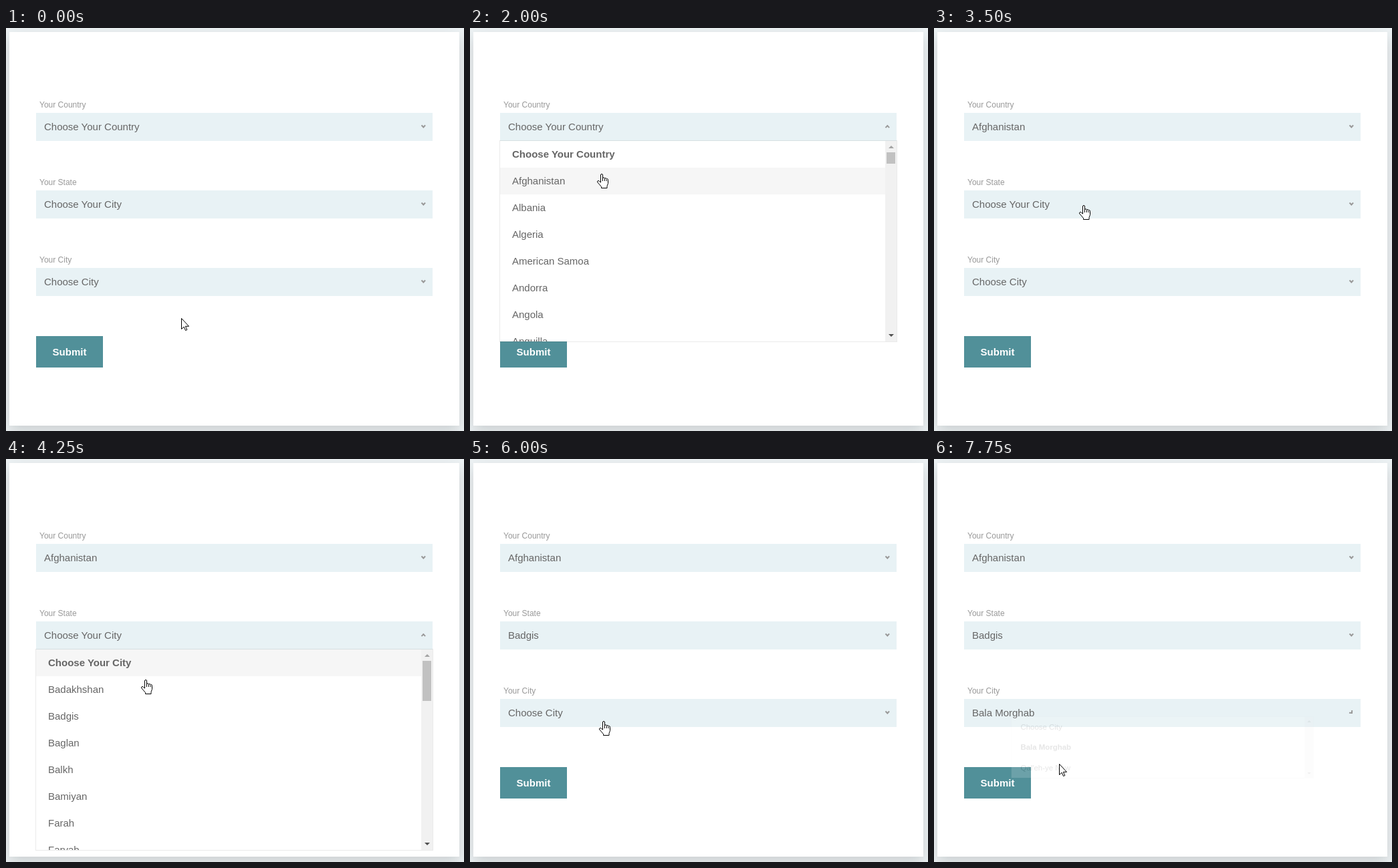
These frames come from a looping animation (685 by 603 pixels, 8 s). An HTML page:

```html
<!DOCTYPE html>
<html lang="en">
<head>
<meta charset="utf-8">
<title>Dependent selects</title>
<style>
* { box-sizing: border-box; }
html, body { margin: 0; width: 100%; height: 100%; overflow: hidden; }
body { position: relative; background: #edf2f4; color: #666; font: 15px Arial, "Liberation Sans", sans-serif; }
body div, body svg { position: absolute; white-space: nowrap; }
.card { left: 5px; top: 6px; width: 673px; height: 589px; background: #fff; box-shadow: 0 8px 20px rgba(0,0,0,.15); }
.label { left: 50px; color: #999; font-size: 12px; line-height: 16px; }
.field { left: 45px; width: 593px; height: 42px; padding-left: 12px; line-height: 42px; background: #e8f2f5; }
.chevron { right: 12px; top: 17px; width: 5px; height: 5px; border: solid #999; border-width: 0 2px 2px 0; transform-origin: 66% 66%; }
.submit { left: 45px; top: 461px; width: 100px; height: 47px; background: #519099; color: #fff; font-weight: bold; line-height: 48px; text-align: center; }
.list { left: 45px; width: 593px; overflow: hidden; background: #fff; transform-origin: 50% 0; }
.frame { left: 0; top: 0; width: 100%; height: 100%; }
.list, .ring { box-shadow: 0 0 0 1px rgba(68,68,68,.11); }
.row { left: 0; width: 576px; height: 40px; padding-left: 18px; line-height: 40px; }
.bar { right: 0; top: 0; width: 17px; height: 100%; background: #f1f1f1; }
.thumb { left: 2px; top: 17px; width: 13px; background: #c1c1c1; }
.tri { left: 5px; width: 8px; height: 4px; background: #a3a3a3; }
.up { top: 7px; clip-path: polygon(50% 0, 100% 100%, 0 100%); }
.down { bottom: 7px; clip-path: polygon(0 0, 100% 0, 50% 100%); }
svg { overflow: visible; fill: #fff; stroke: #000; width: 20px; height: 24px; }
</style>
</head>
<body>
<div class="card"></div>
<div class="submit">Submit</div>
<script>
const LOOP = 8000, STEP = 250;

// Each select: label, field top, options, thumb height, opening time, picking time, picked option
const selects = [
  { label: 'Your Country', top: 127, thumb: 17, open: 1040, close: 2290, pick: 1,
    options: ['Choose Your Country', 'Afghanistan', 'Albania', 'Algeria', 'American Samoa', 'Andorra', 'Angola', 'Anguilla'] },
  { label: 'Your State', top: 243, thumb: 60, open: 3790, close: 5540, pick: 2,
    options: ['Choose Your City', 'Badakhshan', 'Badgis', 'Baglan', 'Balkh', 'Bamiyan', 'Farah', 'Faryab'] },
  { label: 'Your City', top: 359, thumb: 0, open: 6290, close: 7650, pick: 1,
    options: ['Choose City', 'Bala Morghab', "Qal'eh-ye Naw"] }
];

// Pointer path: time, x, y
const path = [
  [0, 262, 434], [250, 256, 405], [750, 228, 225], [1000, 216, 150], [1250, 214, 142],
  [1500, 210, 131], [1750, 203, 182], [2000, 195, 218], [2250, 195, 214], [2500, 197, 208],
  [2750, 197, 208], [3250, 214, 246], [3500, 222, 265], [3750, 222, 259], [4000, 221, 256],
  [4250, 207, 330], [4750, 201, 415], [5000, 198, 400], [5250, 197, 388], [5750, 197, 388],
  [6000, 198, 392], [6500, 200, 384], [6750, 200, 384], [7000, 199, 429], [7250, 197, 458],
  [7500, 191, 462], [7750, 187, 456]
];

function add(parent, cls, text = '', style = {}) {
  const el = document.createElement('div');
  el.className = cls;
  el.textContent = text;
  Object.assign(el.style, style);
  return parent.appendChild(el);
}

function bezier(x1, y1, x2, y2) {
  const at = (a, b, u) => 3 * a * u * (1 - u) ** 2 + 3 * b * u * u * (1 - u) + u ** 3;
  return x => {
    if (x <= 0) return 0;
    if (x >= 1) return 1;
    let lo = 0, hi = 1;
    for (let i = 0; i < 24; i++) {
      const mid = (lo + hi) / 2;
      if (at(x1, x2, mid) < x) lo = mid; else hi = mid;
    }
    return at(y1, y2, lo);
  };
}
const easeOut = bezier(0, 0, .58, 1);
const easeInOut = bezier(.42, 0, .58, 1);
const spring = bezier(.5, 0, 0, 1.25);

const body = document.body;
for (const s of selects) {
  add(body, 'label', s.label, { top: s.top - 20 + 'px' });
  s.field = add(body, 'field', '', { top: s.top + 'px' });
  s.text = s.field.appendChild(document.createElement('span'));
  s.chevron = add(s.field, 'chevron');
}
for (const s of selects) {
  s.listTop = s.top + 42;
  s.height = Math.min(300, s.options.length * 40);
  s.list = add(body, 'list', '', { top: s.listTop + 'px', height: s.height + 'px' });
  s.rows = s.options.map((name, i) => add(s.list, 'row', name, { top: i * 40 + 'px' }));
  const bar = add(s.list, 'bar');
  add(bar, 'tri up');
  add(bar, 'tri down', '', { background: s.thumb ? '#505050' : '#a3a3a3' });
  add(bar, 'thumb', '', { height: s.thumb + 'px' });
}
body.insertAdjacentHTML('beforeend', `
<svg id="arrow"><path d="M.5 .5V16.5L4.2 13.2 6.5 18.5 8.8 17.6 6.4 12.3H11.5Z"/></svg>
<svg id="hand"><path d="M5.5 13V2a1.5 1.5 0 0 1 3 0V7a1.5 1.5 0 0 1 3 .7 1.4 1.4 0 0 1 2.8 .7 1.2 1.2 0 0 1 2.2 1.1V14.5L15 18.5V21.5H6.5V19.5L.9 13a1.4 1.4 0 0 1 2.2-2ZM8.5 7v4M11.5 8v3M14.3 9v2"/></svg>`);
const arrow = document.getElementById('arrow'), hand = document.getElementById('hand');

function pointer(t) {
  const i = path.findIndex(p => p[0] > t);
  if (i < 0) return path[path.length - 1].slice(1);
  const [t0, x0, y0] = path[i - 1], [t1, x1, y1] = path[i];
  const k = (t - t0) / (t1 - t0);
  return [Math.round(x0 + (x1 - x0) * k), Math.round(y0 + (y1 - y0) * k)];
}

function draw(t) {
  const [x, y] = pointer(t);
  let overLink = false;
  for (const s of selects) {
    const picked = t >= s.close, isOpen = t >= s.open && !picked;
    const phase = (ms, ease) => picked ? 1 - ease((t - s.close) / ms) : ease((t - s.open) / ms);
    const chosen = picked ? s.pick : 0;
    const hover = Math.max(0, Math.floor((y - 8 - s.listTop) / 40));
    const grow = phase(200, spring);

    s.text.textContent = s.options[chosen];
    s.chevron.style.transform = `rotate(${45 - 180 * phase(150, easeInOut)}deg)`;
    s.list.style.opacity = phase(150, easeOut);
    s.list.style.transform = `scale(${.75 + .25 * grow}) translateY(${-21 * (1 - grow)}px)`;
    s.rows.forEach((row, i) => {
      row.style.fontWeight = i === chosen ? 'bold' : 'normal';
      row.style.background = isOpen && i === hover ? '#f6f6f6' : '';
    });
    const bottom = s.listTop + (isOpen ? s.height : 0);
    if (y >= s.top && y < bottom) overLink = true;
  }
  arrow.style.display = overLink ? 'none' : '';
  hand.style.display = overLink ? '' : 'none';
  arrow.style.left = x + 'px';
  hand.style.left = x - 5 + 'px';
  arrow.style.top = hand.style.top = y + 'px';
}

let start;
function tick(now) {
  start ??= now;
  draw(Math.floor((now - start) % LOOP / STEP) * STEP);
  requestAnimationFrame(tick);
}
draw(0);
requestAnimationFrame(tick);
</script>
</body>
</html>
```
